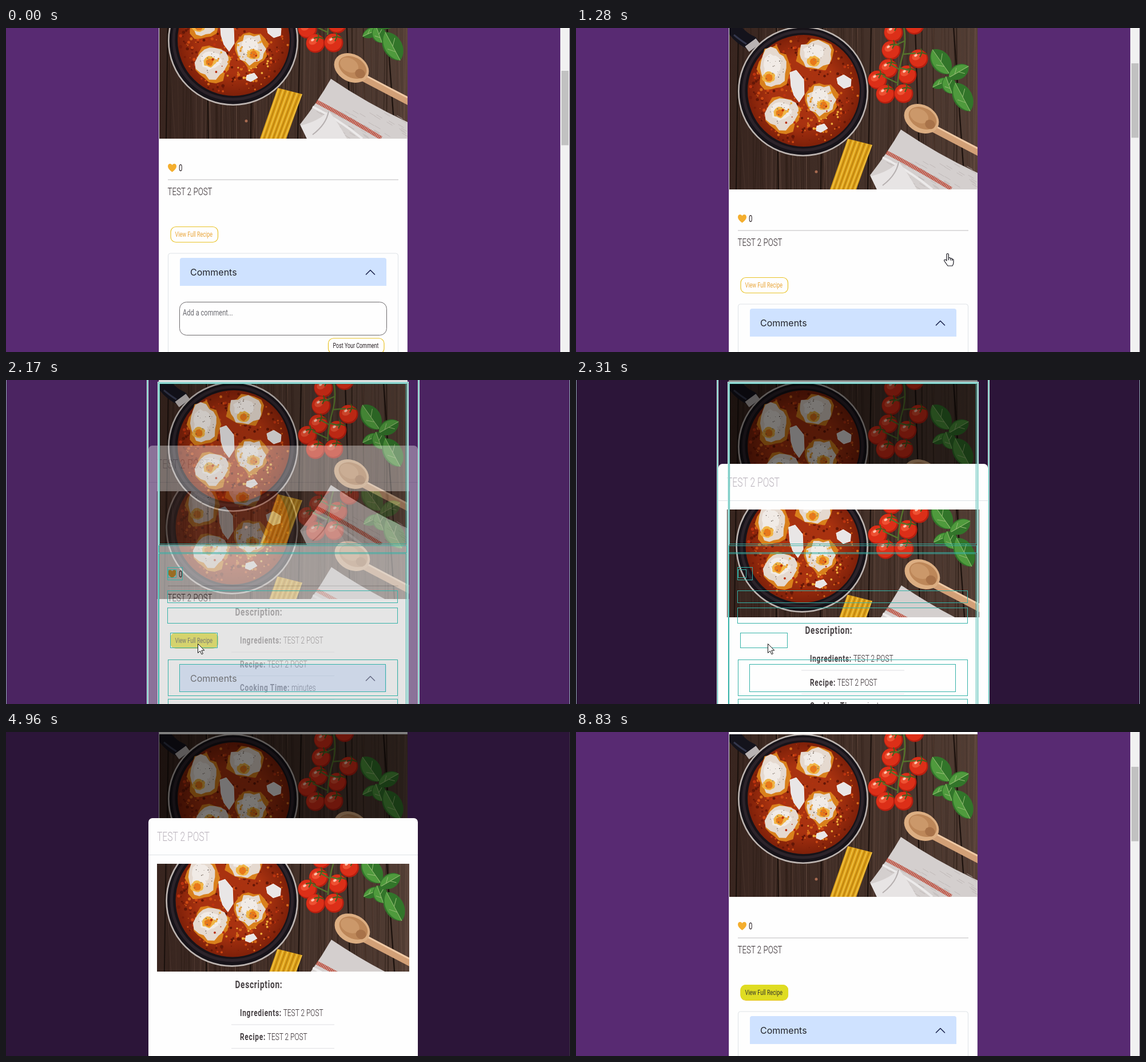
An HTML page that plays this animation: 986 px wide and 568 px high, repeating every 8.91 s.

```html
<!DOCTYPE html>
<html lang="en">
<head>
<meta charset="utf-8">
<title>Recipe post</title>
<style>
html, body { margin: 0; width: 100%; height: 100%; overflow: hidden; background: #582a72; }
svg { display: block; }
#stage { width: 986px; height: 568px; }
text { font-family: Roboto, "Open Sans", sans-serif; font-weight: 300; fill: #2b2226; white-space: pre; }
.bold { font-weight: 700; letter-spacing: 1px; fill: #453f42; }
.plain { font-weight: 400; }
.wide { font-family: Inter, sans-serif; font-weight: 400; fill: #23252b; }
.line { fill: none; stroke: #dee2e6; }
</style>
</head>
<body>
<svg id="stage" viewBox="0 0 986 568"></svg>
<script>
const LOOP = 8910;
let seed = 11;
const rnd = () => {
  seed = (seed * 1664525 + 1013904223) >>> 0;
  return seed / 4294967296;
};
const between = (a, b) => a + (b - a) * rnd();
const pick = list => list[Math.floor(rnd() * list.length)];
const repeat = (n, make) => Array.from({ length: n }, (_, i) => make(i)).join('');

const rect = (x, y, w, h, attrs = '') => `<rect x="${x}" y="${y}" width="${w}" height="${h}" ${attrs}/>`;
const path = (d, attrs = '') => `<path d="${d}" ${attrs}/>`;
const oval = (x, y, rx, ry, fill, turn = 0) =>
  `<ellipse rx="${rx}" ry="${ry}" fill="${fill}" transform="translate(${x} ${y}) rotate(${turn})"/>`;
const dot = (x, y, r, fill) => oval(x.toFixed(1), y.toFixed(1), r.toFixed(1), r.toFixed(1), fill);
// The interface face is a condensed sans
const text = (x, y, size, content, attrs = '') =>
  `<text transform="translate(${x} ${y}) scale(.72 1)" font-size="${size}" ${attrs}>${content}</text>`;

function blob(x, y, rx, ry, fill) {
  const points = repeat(18, i => {
    const a = i / 18 * Math.PI * 2, r = between(.82, 1.12);
    return `${(x + Math.cos(a) * rx * r).toFixed(1)},${(y + Math.sin(a) * ry * r).toFixed(1)} `;
  });
  return `<polygon points="${points}" fill="${fill}" stroke="${fill}" stroke-width="3" stroke-linejoin="round"/>`;
}

function specks(n, x, y, rx, ry, min, max, colors) {
  return repeat(n, () => {
    const a = rnd() * Math.PI * 2, r = Math.sqrt(rnd());
    return dot(x + Math.cos(a) * r * rx, y + Math.sin(a) * r * ry, between(min, max), pick(colors));
  });
}

function wood() {
  const grain = repeat(110, () => {
    const x = between(-5, 440);
    return path(`M${x.toFixed(1)} 0q${between(-5, 5).toFixed(1)} 140 ${between(-7, 7).toFixed(1)} 285`,
      `fill="none" stroke="${pick(['#21150f', '#2a1b16', '#6b5145', '#5b4237'])}" stroke-width="${between(.5, 2).toFixed(1)}" opacity=".45"`);
  });
  const seams = [[16, 12], [82, 86], [163, 160], [248, 242], [325, 334], [392, 412]]
    .map(([a, b]) => path(`M${a} 0L${b} 285`, 'stroke="#1b110d" stroke-width="2.2"')).join('');
  return rect(0, 0, 434, 285, 'fill="url(#wood)"') + grain + seams + dot(152, 254, 2.5, '#a66a50');
}

function egg(x, y, rx, ry, yolkX, yolkY) {
  return blob(x, y + 2, rx + 4, ry + 4, '#d9801c') + blob(x, y, rx, ry, '#e5d9cf') +
    blob(x - 3, y - 4, rx * .6, ry * .55, '#f1ebe6') +
    blob(yolkX, yolkY, 10, 8, '#f0b545') + blob(yolkX, yolkY + 1, 5, 5, '#e8791a') +
    specks(18, x, y, rx * .8, ry * .8, .4, 1, ['#5f554e', '#8c7c70']);
}

function pan() {
  const eggs = [[77, 72, 23, 33, 69, 88], [150, 48, 28, 22, 147, 60], [162, 128, 23, 25, 165, 137], [93, 152, 27, 26, 88, 150]];
  const cheese = ['106,80 117,76 130,92 131,118 122,132 113,120 108,104', '188,90 200,84 213,92 212,104 200,108 190,100', '153,174 166,170 172,178 160,185 152,182'];
  return path('M4 -4Q16 18 38 28', 'fill="none" stroke="#14131c" stroke-width="25" stroke-linecap="round"') +
    path('M8 14Q20 24 30 30', 'fill="none" stroke="#33364b" stroke-width="3"') +
    path('M31 39L50 25', 'stroke="#b9b3b3" stroke-width="12"') +
    '<circle cx="129" cy="113" r="112.7" fill="#171319" stroke="#bdb5b1" stroke-width="2.6"/>' +
    '<circle cx="129" cy="112" r="104" fill="none" stroke="#2c232a" stroke-width="5"/>' +
    '<circle cx="130" cy="112" r="98" fill="url(#sauce)"/>' +
    specks(330, 130, 112, 95, 95, .7, 2.8, ['#cf4a14', '#771b08', '#d86b1a', '#bc3310', '#641707']) +
    eggs.map(e => egg(...e)).join('') +
    specks(45, 145, 148, 55, 40, .8, 2.4, ['#e08a20', '#b92f0e', '#efae3c']) +
    cheese.map(p => `<polygon points="${p}" fill="#e9e6e6" stroke="#f4f2f1"/>`).join('');
}

function tomatoes() {
  const spots = [[287, 10], [324, -3], [283, 41], [331, 56], [278, 73], [311, 84], [259, 93], [273, 118], [305, 117]];
  const fruit = spots.map(([x, y]) => dot(x, y, 16.5, '#b51f10') + dot(x - 1, y - 1, 15, '#dc2f18') +
    oval(x - 4, y - 4, 8, 6, '#ee5132', -30) + oval(x - 5, y - 6, 3, 2, '#ffc4ae', -30)).join('');
  const calyx = spots.map(([x, y]) => path(`M${x + 6} ${y - 11}l-9 2m9-2l-4 8m4-8l8 3m-8-3l-2-7`,
    'stroke="#42601f" stroke-width="2" fill="none"')).join('');
  return fruit + calyx + path('M305 0Q310 26 303 50T294 103M306 25L288 33M303 48L326 46M298 75L282 66M299 72L314 76M293 98L268 86',
    'fill="none" stroke="#55742c" stroke-width="2.4"');
}

function leaf(x, y, w, h, turn) {
  return `<g transform="translate(${x} ${y}) rotate(${turn})">` +
    path(`M0 ${-h}C${w * 1.4} ${-h * .6} ${w * 1.2} ${h * .7} 0 ${h}C${-w * 1.2} ${h * .7} ${-w * 1.4} ${-h * .6} 0 ${-h}`, 'fill="#32752a"') +
    path(`M0 ${-h}C${-w * 1.2} ${-h * .5} ${-w} ${h * .6} 0 ${h}`, 'fill="#4f9a3d"') +
    path(`M0 ${-h}V${h}M0 0L${w * .6} ${-h * .4}M0 ${h * .4}L${-w * .6} 0`, 'stroke="#94bb72" stroke-width="1" fill="none"') + '</g>';
}

function utensils() {
  const pasta = repeat(11, i => path(`M${209 + i * 4} ${197 + i}L${179 + i * 4} 285`,
    `stroke="${i % 2 ? '#b47a0c' : '#f4c94b'}" stroke-width="1.4"`));
  const weave = repeat(60, () => {
    const x = between(275, 425);
    return path(`M${x.toFixed(1)} ${between(235, 280).toFixed(1)}l10 6`, 'stroke="#bab3b2" stroke-width=".8"');
  });
  return path('M207 196L250 207L222 285H176Z', 'fill="#dda01a"') + pasta +
    path('M300 180Q365 224 434 256V285H258L246 260Q276 222 300 180', 'fill="#d4cfce"') + weave +
    path('M275 220Q325 246 388 284', 'fill="none" stroke="#bd4d3c" stroke-width="7" stroke-dasharray="2 .8"') +
    path('M268 229Q312 250 355 285', 'fill="none" stroke="#eceaea" stroke-width="4"') +
    path('M296 236Q312 256 328 285H258L247 262Q280 254 296 236', 'fill="#e7e4e4"') +
    path('M296 237Q292 260 268 278', 'fill="none" stroke="#b6b0b0" stroke-width="2"') +
    path('M356 172L434 211V226L352 183Z', 'fill="#d2a077"') +
    path('M362 175L434 213', 'stroke="#efc9a5" stroke-width="3"') +
    oval(336, 161, 32, 24, '#dcae82', 28) + oval(338, 160, 26, 18, '#bd8759', 28) +
    oval(332, 156, 17, 12, '#cb986a', 28) + oval(351, 171, 9, 8, '#a87249', 28);
}

const photo = wood() + pan() + tomatoes() +
  leaf(370, 61, 17, 26, -35) + leaf(401, 79, 13, 20, 60) + leaf(370, 99, 9, 16, 65) +
  leaf(384, 102, 13, 16, -20) + leaf(408, 123, 17, 28, -28) + utensils();

const picture = (x, y, w, h, top, span) =>
  `<svg x="${x}" y="${y}" width="${w}" height="${h}" viewBox="0 ${top} 434 ${span}" preserveAspectRatio="none"><use href="#photo"/></svg>`;

const pill = (x, y, w, attrs) => rect(x, y, w, 27, `rx="9" ${attrs}`);
const buttonText = fill => text(295.5, 461, 12.6, 'View Full Recipe', `style="fill:${fill}" class="plain"`);

const page = rect(267, -120, 435, 900, 'fill="#fefefe"') +
  rect(267.5, -120, 434, 900, 'class="line"') +
  picture(268, 4, 434, 285, 0, 285) +
  path('M290.500 347.500C286 344 283 341 283 337.300C283 332.500 288.500 331.600 290.500 335.500C292.500 331.600 298 332.500 298 337.300C298 341 295 344 290.500 347.500Z', 'fill="#f4ae2e"') +
  text(302, 346, 16, '0', 'class="plain"') +
  rect(283, 360.5, 403, 1, 'fill="#bdbbbd"') +
  text(282.5, 388, 18.5, 'TEST 2 POST') +
  pill(288, 443.5, 82.5, 'fill="#fefefe" stroke="#e9c327" stroke-width="1.2"') + buttonText('#e9a63a') +
  `<g id="hot">${pill(287.5, 443, 83.5, 'fill="#dfdc22"')}${buttonText('#3a3a2c')}</g>` +
  rect(283.5, 490, 402, 400, 'rx="4" class="line"') +
  path('M304 547V502Q304 498 308 498H661Q665 498 665 502V547Z', 'fill="#cfe2ff"') +
  '<text x="322" y="528.500" font-size="16" class="wide">Comments</text>' +
  path('M629.500 527L637 519.500L644.500 527', 'fill="none" stroke="#1c2350" stroke-width="1.6" stroke-linecap="round" stroke-linejoin="round"') +
  rect(303.5, 575.5, 362, 58, 'rx="12" fill="#fefefe" stroke="#6d6a6d"') +
  text(309, 599, 15.5, 'Add a comment...', 'style="fill:#6a6a70" class="plain"') +
  pill(563.5, 639, 97.5, 'fill="#fefefe" stroke="#e9c327" stroke-width="1.2"') +
  text(571.5, 656, 12.4, 'Post Your Comment', 'class="plain"');

const rows = [['Ingredients:', 'TEST 2 POST'], ['Recipe:', 'TEST 2 POST'], ['Cooking Time:', 'minutes']];
const modal = rect(249, 151, 471, 500, 'rx="7" fill="#fefefe"') +
  text(264, 191, 21.8, 'TEST 2 POST', 'style="fill:#b9b2bb"') +
  rect(249, 215, 471, 1, 'fill="#dee2e6"') +
  picture(264, 231, 441, 189, 49.2, 186) +
  text(400.5, 449, 19, 'Description:', 'class="bold"') +
  rows.map(([label, value], i) => text(409, 498 + i * 41.6, 16.6, `<tspan class="bold">${label}</tspan> ${value}`) +
    rect(394, 512.5 + i * 41.6, 180, 1, 'fill="#dfdfe4"')).join('');

// Layout outlines as left, top, right, bottom
const boxes = [[268, 6, 700, 288], [267, 290, 701, 303], [267, 304, 700, 600], [282, 328, 309, 351], [283, 332, 298, 347],
  [282, 369, 685, 391], [282, 399, 685, 427], [287, 443, 370, 470], [283, 490, 685, 554], [303, 498, 664, 547], [283, 559, 685, 600]];
const outline = ([l, t, r, b], stroke = '#35b2a8', width = 1) =>
  rect(l + .5, t + .5, r - l - 1, b - t - 1, `fill="none" stroke="${stroke}" stroke-width="${width}"`);
const framed = box => outline(box, '#e9f6f5', 3) + outline(box);

document.getElementById('stage').innerHTML = `
<defs>
  <linearGradient id="wood"><stop stop-color="#38251f"/><stop offset=".55" stop-color="#443129"/><stop offset="1" stop-color="#513d34"/></linearGradient>
  <radialGradient id="sauce"><stop offset=".6" stop-color="#a93210"/><stop offset="1" stop-color="#7e2009"/></radialGradient>
  <g id="photo">${photo}</g>
</defs>
${rect(0, 0, 986, 568, 'fill="#582a72"')}
<g id="page">${page}</g>
<g id="bar">${rect(969, 0, 16, 568, 'fill="#f1f1f1"')}${rect(971, 0, 12.5, 130.5, 'id="thumb" fill="#c1c1c1"')}</g>
${rect(985, 0, 1, 568, 'fill="#776580"')}
${rect(0, 0, 986, 568, 'id="shade"')}
<g id="modal">${modal}</g>
<g id="boxes">${framed([266, 4, 703, 600])}${boxes.map(b => outline(b)).join('')}</g>
<g id="frames">${framed([247, -5, 722, 600])}${outline([0, -5, 986, 600], '#8fa9b2')}</g>
<g id="arrow">${path('M.5 .5V16.500L4.300 13L7 18.800L9.400 17.800L6.800 12H11.800Z', 'fill="#fff" stroke="#111"')}</g>
<g id="hand">${path('M5 12V2.500Q5 .5 6.700 .5T8.400 2.500V8Q11 7 11.800 9Q14 8.200 14.600 10Q17 9.800 17 12V16Q17 19 15 22H7Q4 18 1 13.500Q0 11.500 2 11Q3.500 11 5 13ZM8.400 8V12M11.800 9V12.500M14.600 10V13',
  'fill="#fff" stroke="#1a1a22" stroke-width="1.2" stroke-linejoin="round"')}</g>`;

const $ = Object.fromEntries([...document.querySelectorAll('#stage [id]')].map(el => [el.id, el]));

// Each row: start time, then the values held until the next row
const scroll = [[0, -95], [1070, -91], [1140, -72], [1210, -34], [1280, -6], [1350, 0]];
const hover = [[0, 0], [1630, .35], [1700, .8], [1770, 1], [7560, 0], [7650, .45], [7740, .85], [7830, 1]];
const dialog = [[0, 0, 0, 0], [2110, 0, 0, -50], [2170, .15, .355, -36], [2240, .36, .82, -14],
  [2310, .5, 1, -4], [2380, .5, 1, -1], [2440, .5, 1, 0], [7560, 0, 0, 0]];
const pointer = [[0, ''],
  [720, 'arrow', 947, 507], [790, 'arrow', 880, 484], [860, 'arrow', 790, 452], [930, 'arrow', 705, 420],
  [1000, 'hand', 643, 395], [1420, 'arrow', 560, 422], [1490, 'arrow', 430, 456], [1560, 'arrow', 350, 474],
  [1630, 'hand', 341, 469], [1700, 'hand', 335, 464], [1840, 'hand', 331, 462], [2110, 'arrow', 335, 462],
  [3140, 'arrow', 347, 463], [3200, 'arrow', 378, 465], [3260, 'arrow', 406, 465], [3330, 'arrow', 418, 464],
  [3860, 'arrow', 460, 466], [3930, 'arrow', 560, 470], [4000, 'arrow', 670, 460], [4070, 'arrow', 760, 440],
  [4140, 'arrow', 800, 426], [4210, 'arrow', 809, 421],
  [4610, 'arrow', 812, 430], [4680, 'arrow', 820, 456], [4750, 'arrow', 829, 490], [4820, 'arrow', 836, 520],
  [4890, 'arrow', 839, 546], [4960, ''],
  [8160, 'arrow', 872, 548], [8230, 'arrow', 880, 525], [8300, 'arrow', 900, 538], [8370, 'arrow', 912, 554], [8430, '']];

const at = (table, time) => table.findLast(row => row[0] <= time).slice(1);
const show = (el, visible) => el.setAttribute('visibility', visible ? 'visible' : 'hidden');
const move = (el, x, y) => el.setAttribute('transform', `translate(${x} ${y})`);
const within = (time, from, to) => time >= from && time < to;

function render(time) {
  const [offset] = at(scroll, time);
  const [shade, opacity, drop] = at(dialog, time);
  const [kind, x, y] = at(pointer, time);
  move($.page, 0, offset);
  $.thumb.setAttribute('y', 61 - offset * 14 / 95);
  $.hot.setAttribute('opacity', at(hover, time)[0]);
  $.shade.setAttribute('opacity', shade);
  $.modal.setAttribute('opacity', opacity);
  move($.modal, 0, drop);
  show($.bar, !within(time, 2110, 7560));
  show($.boxes, within(time, 2040, 2510) || within(time, 7560, 7830));
  show($.frames, within(time, 2110, 2510));
  for (const name of ['arrow', 'hand']) {
    show($[name], kind === name);
    if (kind === name) move($[name], x, y);
  }
}

const start = performance.now();
function tick() {
  render((performance.now() - start) % LOOP);
  requestAnimationFrame(tick);
}
tick();
</script>
</body>
</html>
```
